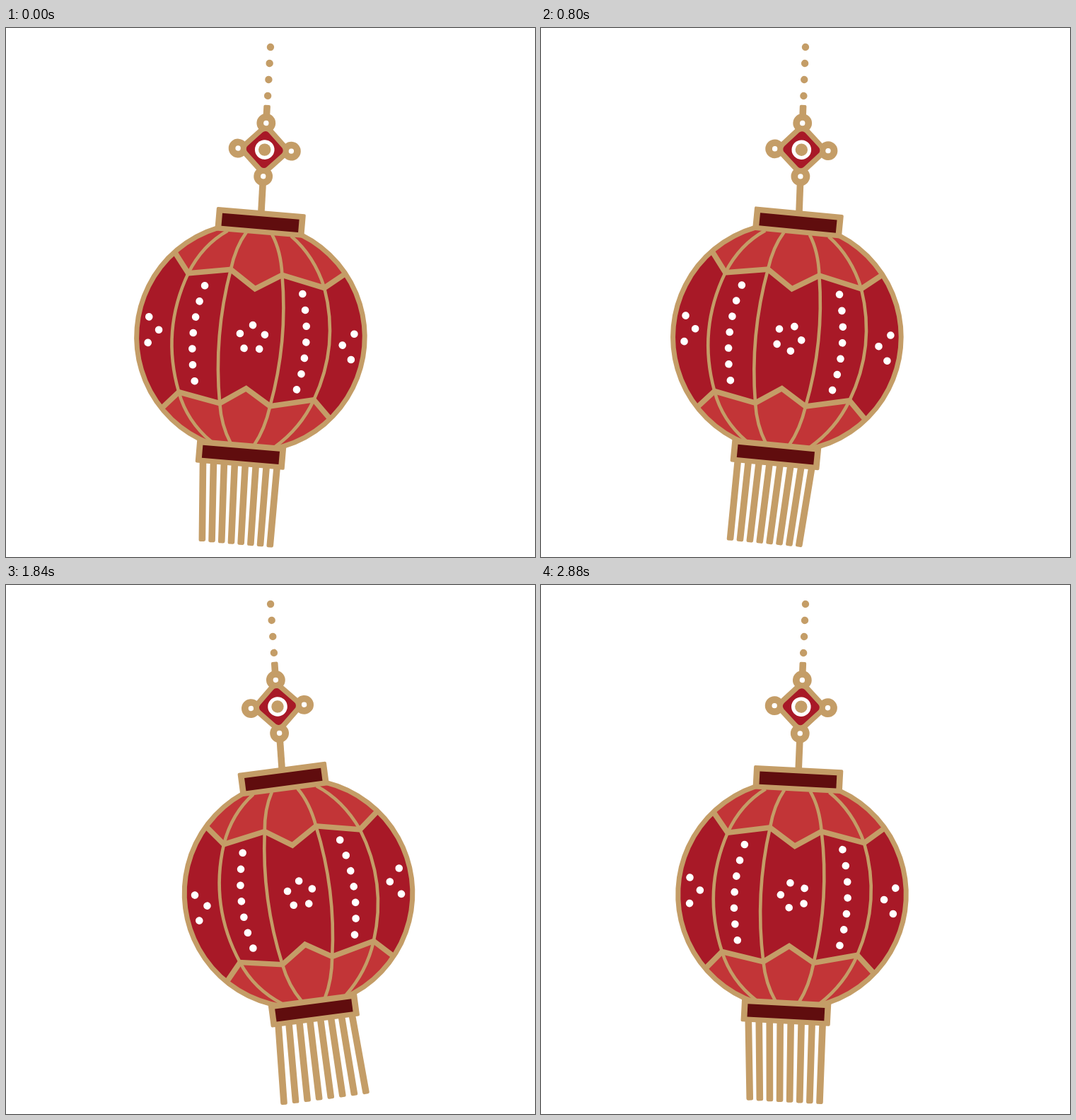
These frames come from a looping animation (748x748 px, 2960 ms). An HTML page with a canvas:

```html
<!DOCTYPE html>
<html lang="en">
<head>
<meta charset="utf-8">
<title>Swinging lantern</title>
<style>
  html, body { margin: 0; width: 100%; height: 100%; overflow: hidden; background: #fff; }
  canvas { display: block; width: 100vw; height: 100vh; }
</style>
</head>
<body>
<canvas id="stage" width="748" height="748"></canvas>
<script>
const ctx = document.getElementById('stage').getContext('2d');
const GOLD = '#c49d67', RED = '#a81927', BRIGHT = '#c23537', DARK = '#600d0e', WHITE = '#fff';
const LOOP = 2960, STEP = 80, PERIOD = 3015, RAD = Math.PI / 180;

const BODY = { x: 0, y: 180, r: 161.3 };
const TOP_ZIGZAG = [[-135, 46], [-95.5, 97.5], [-36, 87.2], [0.4, 111.5], [37, 89], [98, 102], [150, 60]];
const LOW_ZIGZAG = [[-143, 320], [-94.7, 266], [-35.7, 277], [-0.3, 253], [35.5, 275], [96.5, 261], [145, 309]];
// Zigzag corner, end at top cap, end at bottom cap, and the bulge of each section
const RIBS = [
  { i: 1, end: -45, low: -43, top: [-79, 56], mid: -127, bottom: [-80, 306] },
  { i: 2, end: -18.5, low: -15.5, top: [-32, 55], mid: -52.5, bottom: [-31, 308] },
  { i: 4, end: 18, low: 17.5, top: [32.5, 55], mid: 53, bottom: [31, 308] },
  { i: 5, end: 45, low: 47, top: [80, 58], mid: 126, bottom: [81, 303] }
];

const swing = (t, amp, phase) => amp * Math.cos(2 * Math.PI * t / PERIOD - phase * RAD) * RAD;

function dot(x, y, r, color) {
  ctx.fillStyle = color;
  ctx.beginPath();
  ctx.arc(x, y, r, 0, 2 * Math.PI);
  ctx.fill();
}

function box(x, y, w, h, r, color) {
  ctx.fillStyle = color;
  ctx.beginPath();
  ctx.roundRect(x, y, w, h, r);
  ctx.fill();
}

function trace(points) {
  ctx.beginPath();
  points.forEach(([x, y]) => ctx.lineTo(x, y));
}

function diamond(y, half, r, color) {
  const side = half * Math.SQRT2;
  ctx.save();
  ctx.translate(0, y);
  ctx.rotate(Math.PI / 4);
  box(-side / 2, -side / 2, side, side, r, color);
  ctx.restore();
}

function drawOrnament() {
  for (let i = 0; i < 4; i++) dot(0.2, 1 + i * 23, 5.2, GOLD);
  box(-4.8, 83, 9.6, 20, 2, GOLD);
  box(-4.8, 190, 9.6, 46, 0, GOLD);
  const y = 146.3, d = 37.7;
  const rings = [[0, y - d], [0, y + d], [-d, y], [d, y]];
  rings.forEach(([rx, ry]) => dot(rx, ry, 13.4, GOLD));
  diamond(y, 39, 6, GOLD);
  rings.forEach(([rx, ry]) => dot(rx, ry, 3.7, WHITE));
  diamond(y, 28.5, 6, RED);
  dot(0, y, 13.8, WHITE);
  dot(0, y, 8.7, GOLD);
}

function drawTassel(t, tilt) {
  const left = swing(t, 5.7, 84), right = swing(t, 11.1, 62.7);
  for (let i = 0; i < 8; i++) {
    const k = i / 7;
    ctx.save();
    ctx.translate(-52.5 + 105 * k, 360);
    ctx.rotate(left + (right - left) * k - tilt);
    box(-4.8, 0, 9.6, 114, 2.5, GOLD);
    ctx.restore();
  }
}

function drawBands() {
  ctx.fillStyle = BRIGHT;
  trace([[-135, -20], ...TOP_ZIGZAG, [150, -20]]);
  ctx.fill();
  trace([[-143, 380], ...LOW_ZIGZAG, [145, 380]]);
  ctx.fill();
}

function drawSeams() {
  ctx.strokeStyle = GOLD;
  ctx.lineWidth = 4.6;
  for (const rib of RIBS) {
    const [ux, uy] = TOP_ZIGZAG[rib.i], [lx, ly] = LOW_ZIGZAG[rib.i];
    ctx.beginPath();
    ctx.moveTo(rib.end, 33);
    ctx.quadraticCurveTo(...rib.top, ux, uy);
    ctx.quadraticCurveTo(rib.mid, (uy + ly) / 2, lx, ly);
    ctx.quadraticCurveTo(...rib.bottom, rib.low, 332);
    ctx.stroke();
  }
  ctx.lineWidth = 7.6;
  for (const line of [TOP_ZIGZAG, LOW_ZIGZAG]) {
    trace(line);
    ctx.stroke();
  }
}

function drawDots(t) {
  const r = 5.3;
  for (let i = 0; i < 7; i++) {
    const bend = 1.02 * (i - 3.25) ** 2, y = 113 + 22.6 * i;
    dot(bend - 81.5, y, r, WHITE);
    dot(78.8 - bend, y, r, WHITE);
  }
  for (const side of [-1, 1]) {
    for (const [x, y] of [[145.6, 163.5], [130.3, 180.7], [144.1, 200]]) dot(side * x, y, r, WHITE);
  }
  const turn = 2 * Math.PI * t / PERIOD - 2 * RAD;
  for (let i = 0; i < 5; i++) {
    const a = turn + i * 72 * RAD;
    dot(2.3 + 18.4 * Math.sin(a), 181.3 - 18.4 * Math.cos(a), r, WHITE);
  }
}

function drawCap(y) {
  box(-63.2, y, 126.4, 33.6, 2, GOLD);
  box(-54.5, y + 8.2, 109, 18.2, 0, DARK);
}

function drawLantern(t, tilt) {
  drawTassel(t, tilt);
  ctx.save();
  ctx.beginPath();
  ctx.arc(BODY.x, BODY.y, BODY.r, 0, 2 * Math.PI);
  ctx.fillStyle = RED;
  ctx.fill();
  ctx.clip();
  drawBands();
  drawSeams();
  ctx.restore();
  ctx.strokeStyle = GOLD;
  ctx.lineWidth = 7;
  ctx.beginPath();
  ctx.arc(BODY.x, BODY.y, BODY.r, 0, 2 * Math.PI);
  ctx.stroke();
  drawDots(t);
  drawCap(0.4);
  drawCap(329.6);
}

function draw(t) {
  const sway = swing(t, 4, 38), tilt = swing(t, 7.68, 51.2);
  ctx.fillStyle = WHITE;
  ctx.fillRect(0, 0, 748, 748);
  ctx.save();
  ctx.translate(373.8, 26);
  ctx.rotate(sway);
  drawOrnament();
  ctx.translate(0, 232);
  ctx.rotate(tilt - sway);
  drawLantern(t, tilt);
  ctx.restore();
}

let start;
function tick(now) {
  start ??= now;
  const t = (now - start) % LOOP;
  draw(Math.floor(t / STEP) * STEP);
  requestAnimationFrame(tick);
}
draw(0);
requestAnimationFrame(tick);
</script>
</body>
</html>
```
